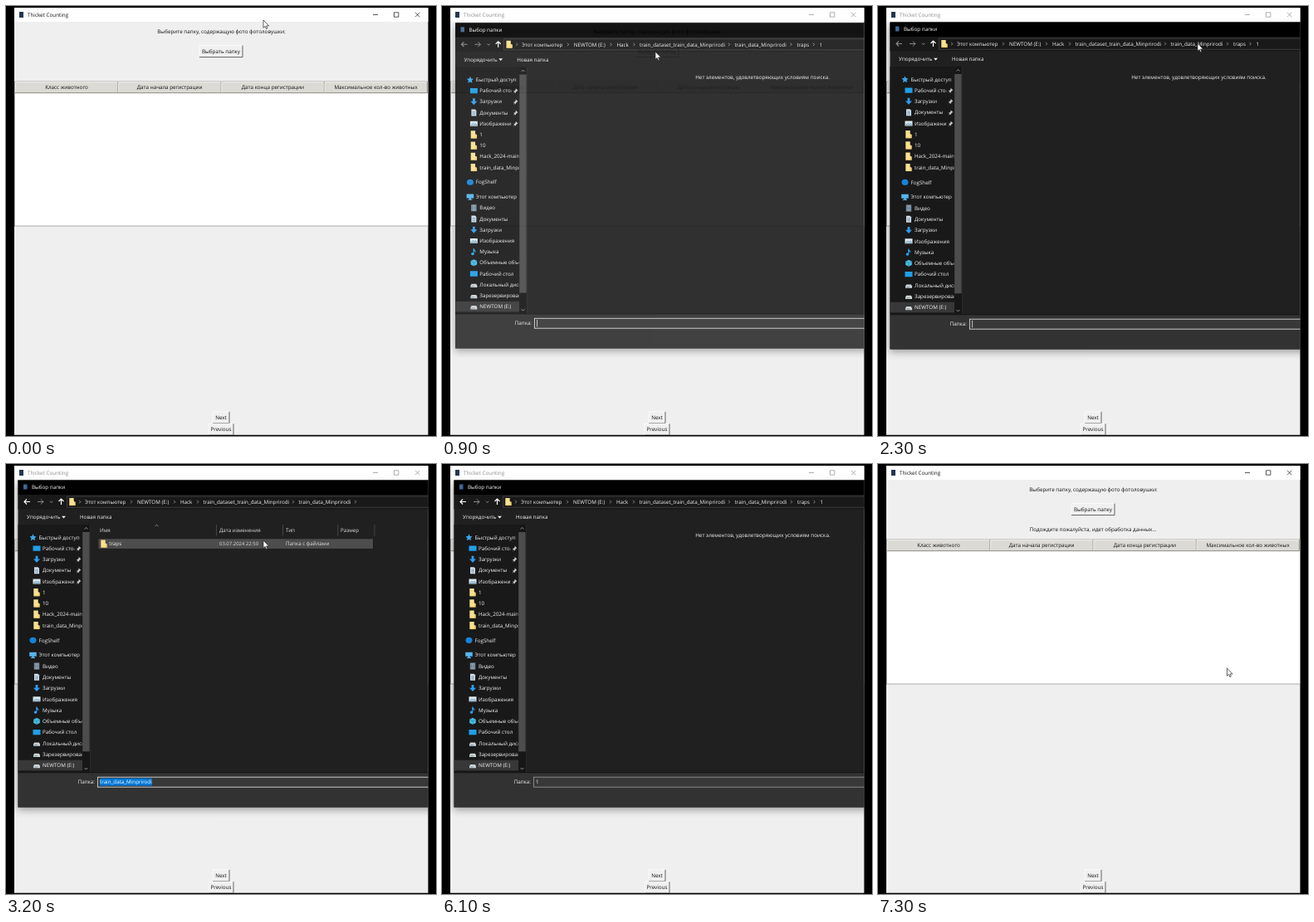
Animation of 518 by 518 pixels, one loop 8 s. Source, as an HTML page:

```html
<!DOCTYPE html>
<html lang="ru">
<head>
<meta charset="utf-8">
<title>Thicket Counting</title>
<style>
html, body { margin: 0; width: 100%; height: 100%; overflow: hidden; background: #000; }
svg { display: block; width: 100vw; height: 100vh; }
text { font-family: "Open Sans", "Noto Sans", sans-serif; text-rendering: geometricPrecision; white-space: pre; }
</style>
</head>
<body>
<svg id="stage" viewBox="0 0 518 518">
  <defs>
    <clipPath id="window"><rect x="10" y="2.3" width="498.5" height="514.4"/></clipPath>
    <clipPath id="sidebar"><rect x="15" y="73" width="76.5" height="299"/></clipPath>
    <clipPath id="pinned"><rect x="15" y="73" width="67.5" height="299"/></clipPath>
    <clipPath id="files"><rect x="102" y="87" width="407" height="284.7"/></clipPath>
    <filter id="blur" x="-10%" y="-10%" width="120%" height="120%"><feGaussianBlur stdDeviation="5"/></filter>
  </defs>
</svg>
<script>
const LOOP = 8000, STEP = 100;
const MAIN_SIZE = 6.3, DIALOG_SIZE = 6.25, ROW = 11.63, ROW_TOP = 90.3;
const INK = '#f2f2f2';
const stage = document.getElementById('stage');

function add(parent, tag, attrs = {}, content) {
  const node = document.createElementNS('http://www.w3.org/2000/svg', tag);
  for (const key in attrs) node.setAttribute(key, attrs[key]);
  if (content !== undefined) node.textContent = content;
  return parent.appendChild(node);
}
const group = (parent, attrs) => add(parent, 'g', attrs);
const box = (parent, x, y, width, height, fill, attrs) => add(parent, 'rect', { x, y, width, height, fill, ...attrs });
const line = (parent, d, stroke, width = 0.7) =>
  add(parent, 'path', { d, stroke, fill: 'none', 'stroke-width': width });
const label = (parent, x, y, content, fill = INK, size = DIALOG_SIZE, attrs) =>
  add(parent, 'text', { x, y: y + 2.2, fill, 'font-size': size, ...attrs }, content);
const centred = (parent, x, y, content) =>
  label(parent, x, y, content, '#111', MAIN_SIZE, { 'text-anchor': 'middle' });
const show = (node, on) => node.setAttribute('visibility', on ? 'inherit' : 'hidden');

// Main window
const main = group(stage, { 'clip-path': 'url(#window)' });
box(main, 10, 2, 499, 515, '#efefef');
box(main, 10, 2, 499, 17, '#fff');
box(main, 16, 7, 5, 7, '#26364f');
const titleBar = group(main);
label(titleBar, 26, 10.5, 'Thicket Counting', 'currentColor', MAIN_SIZE);
line(titleBar, 'M442 10.5h6M467.5 7.8h5.4v5.4h-5.4zM493 7.8l5.4 5.4M498.4 7.8l-5.4 5.4', 'currentColor');

function button(x, y, w, h, name) {
  box(main, x, y, w, h, '#f0f0f0');
  const light = line(main, `M${x} ${y + h}V${y}h${w}`, '#fff');
  const dark = line(main, `M${x} ${y + h}h${w}V${y}`, '#555', 0.9);
  centred(main, x + w / 2, y + h / 2, name);
  return pressed => {
    light.setAttribute('stroke', pressed ? '#555' : '#fff');
    dark.setAttribute('stroke', pressed ? '#fff' : '#555');
  };
}
centred(main, 259.5, 30.7, 'Выберите папку, содержащую фото фотоловушки:');
const pressChoose = button(233, 47.6, 52, 14, 'Выбрать папку');
const status = centred(main, 259, 78.7, 'Подождите пожалуйста, идет обработка данных...');
button(249, 488.8, 20, 14, 'Next');
button(244, 503.2, 30, 13.6, 'Previous');

box(main, 10.4, 91, 498, 174, '#fff', { stroke: '#9a9a96', 'stroke-width': 0.8 });
['Класс животного', 'Дата начала регистрации', 'Дата конца регистрации', 'Максимальное кол-во животных']
  .forEach((name, i) => {
    const x = 11 + i * 124.2;
    box(main, x, 91.3, 124.2, 13.5, '#dcdad5');
    line(main, `M${x + 0.5} 104V91.8h123`, '#f4f3f0');
    line(main, `M${x} 104.7h124V91`, '#77756f', 0.8);
    centred(main, x + 62, 98.2, name);
  });

// Folder dialog
const dialogClip = group(stage, { 'clip-path': 'url(#window)' });
const dialog = group(dialogClip);
box(dialog, 14, 24, 600, 393, '#000', { opacity: 0.33, filter: 'url(#blur)' });
box(dialog, 14.5, 19.5, 600, 394, '#202020');
box(dialog, 14.5, 19.5, 600, 17.5, '#000');
box(dialog, 21, 24.5, 4.5, 6, '#3d6796');
label(dialog, 31, 28, 'Выбор папки', '#fff');
box(dialog, 14.5, 37, 600, 17.5, '#191919');
box(dialog, 73.5, 39, 540, 13.2, '#191919', { stroke: '#4a4a4a', 'stroke-width': 0.7 });

const back = line(dialog, 'M29 45.5h-7M25 42.5l-3 3 3 3', '#fff', 1.1);
line(dialog, 'M38 45.5h7M42 42.5l3 3-3 3', '#8a8a8a', 1);
line(dialog, 'M53 44.8l1.7 1.7 1.7-1.7', '#aaa', 0.8);
line(dialog, 'M66.5 49v-7M63.5 45l3-3 3 3', '#fff', 1.2);

const toolbar = group(dialog);
label(toolbar, 25, 63.7, 'Упорядочить');
add(toolbar, 'path', { d: 'M67 62.7h5l-2.5 2.7z', fill: INK });
label(toolbar, 89, 63.7, 'Новая папка');

// Each icon: fill, shape, then an optional detail line and its colour
const ICONS = {
  star: ['#3ba7ee', 'M4 0l1.2 2.7 2.8.3-2 2 .6 3L4 6.5 1.4 8 2 5 0 3l2.8-.3z'],
  desk: ['#1f9fe8', 'M-.5 .8h9v6.4h-9z'],
  down: ['#2f9df0', 'M2.6 0h2.8v3.6H8L4 8 0 3.6h2.6z'],
  doc: ['#d5dde4', 'M1 0h4.5L7 1.5V8H1z', 'M2.2 3h3.6M2.2 4.6h3.6M2.2 6.2h3.6'],
  pic: ['#dce8ee', 'M-.5 1h9v6h-9z', 'M.6 6l2.2-2.4 1.8 1.3L6 3.8 7.6 6z'],
  folder: ['#f9e08e', 'M.3-.6h5.4v4l2 .8v4.4H.3z', 'M6.6 4.4v3.8H1', '#e3b748'],
  dot: ['#1683d8', 'M0 4a4 3.6 0 108 0a4 3.6 0 10-8 0'],
  pc: ['#55b5ec', 'M-.3 .5h8.6v5H5.2v1.3h1.3v.9h-5v-.9h1.3V5.5H-.3z'],
  video: ['#9298a0', 'M.8 0h6.4v8H.8z', 'M2 0v8M6 0v8M2 4h4'],
  music: ['#2fa2ef', 'M3.2 0h1.1C4.5 2 7 2.3 6.3 5 5.8 3.7 5 3.3 4.3 3.2V6.5a1.8 1.5 0 11-1.1-1.3z'],
  cube: ['#45bde2', 'M4 0l3.8 1.8v4.4L4 8 .2 6.2V1.8z', 'M.4 2L4 3.8 7.6 2M4 3.8V8'],
  drive: ['#d2d2d2', 'M1.2 3h5.6L8 5v2.4H0V5z', 'M1 6h4']
};
function icon(parent, name, x, y) {
  const [fill, shape, detail, detailColor = '#397ba5'] = ICONS[name];
  const g = group(parent, { transform: `translate(${x} ${y - 4})` });
  add(g, 'path', { d: shape, fill });
  if (detail) line(g, detail, detailColor, 0.6);
}

box(dialog, 14.5, 73, 87, 299, '#191919');
box(dialog, 15, 356.7, 77, 12.6, '#383838');
const side = group(dialog, { 'clip-path': 'url(#sidebar)' });
const pinnedItems = group(side, { 'clip-path': 'url(#pinned)' });
const quick = [['desk', 'Рабочий стол'], ['down', 'Загрузки'], ['doc', 'Документы'], ['pic', 'Изображения'],
  ['folder', '1'], ['folder', '10'], ['folder', 'Hack_2024-main'], ['folder', 'train_data_Minprirodi']];
const computer = [['video', 'Видео'], ['doc', 'Документы'], ['down', 'Загрузки'], ['pic', 'Изображения'],
  ['music', 'Музыка'], ['cube', 'Объемные объекты'], ['desk', 'Рабочий стол'], ['drive', 'Локальный диск'],
  ['drive', 'Зарезервировано'], ['drive', 'NEWTOM (E:)']];
function sideItem(parent, kind, name, x, y) {
  icon(parent, kind, x - 11, y);
  label(parent, x, y, name);
}
sideItem(side, 'star', 'Быстрый доступ', 39.5, 88.3);
quick.forEach(([kind, name], i) => {
  const y = 101.6 + i * 13.27;
  sideItem(i < 4 ? pinnedItems : side, kind, name, 44, y);
  if (i < 4) add(side, 'path', { d: `M87.6 ${y - 3}l2.8 2.8-.9.4-1.6 1.6-.2 1.4-1.2-1.2-2 1.8 1.6-2.2-1.2-1.2 1.6-.4 1.2-1.6z`, fill: '#c4c4c4' });
});
sideItem(side, 'dot', 'FogShelf', 39.5, 212.3);
sideItem(side, 'pc', 'Этот компьютер', 39.5, 230.2);
computer.forEach(([kind, name], i) => sideItem(side, kind, name, 44, 243.5 + i * 13.27));

box(dialog, 92, 73, 9, 299, '#171717');
box(dialog, 92.2, 82, 8.4, 264.3, '#4d4d4d');
line(dialog, 'M94.5 78.5l2-2 2 2M94.5 366l2 2 2-2', '#999', 0.9);
line(dialog, 'M101.6 73v299', '#333');

const crumbs = [[95, 'Этот компьютер', 151], [158, 'NEWTOM (E:)', 203], [210, 'Hack', 231],
  [237.6, 'train_dataset_train_data_Minprirodi', 346], [352.6, 'train_data_Minprirodi', 421],
  [428, 'traps', 448.5], [455.5, '1']];
const chevron = (parent, x) => line(parent, `M${x - 0.9} 43.8l1.7 1.8-1.7 1.8`, '#bbb');
icon(dialog, 'folder', 76, 45.5);
chevron(dialog, 89);
const crumbNodes = crumbs.map(([x, name, next]) => {
  const g = group(dialog);
  label(g, x, 45.6, name);
  if (next) chevron(g, next);
  return g;
});

const empty = label(dialog, 386.4, 85.6, 'Нет элементов, удовлетворяющих условиям поиска.', INK, 6.35,
  { 'text-anchor': 'middle' });
const columns = group(dialog);
[[113, 'Имя'], [257, 'Дата изменения'], [337, 'Тип'], [403, 'Размер']]
  .forEach(([x, name]) => label(columns, x, 80, name, '#dcdcdc'));
line(columns, 'M253.5 73v13.5M333.5 73v13.5M399.8 73v13.5M444 73v13.5', '#555');
line(columns, 'M179.5 75l2-1.6 2 1.6', '#aaa');

const files = group(dialog, { 'clip-path': 'url(#files)' });
const hover = box(files, 111.5, 0, 330.5, ROW, '#4d4d4d');
const selected = box(files, 111.5, ROW_TOP, 330.5, ROW, '#777');
function fileList(rows) {
  const list = group(files);
  rows.forEach(([name, date], i) => {
    const y = 96.1 + i * ROW;
    icon(list, 'folder', 114, y);
    label(list, 124.2, y, name);
    label(list, 257, y, date, '#e0e0e0', 5.95);
    label(list, 337, y, 'Папка с файлами', '#e0e0e0');
  });
  return list;
}
const parentList = fileList([['traps', '03.07.2024 22:50']]);
const numbers = Array.from({ length: 25 }, (_, i) => i < 23 ? i + 1 : i + 2);
const trapList = fileList(numbers.map(n => [n, '03.07.2024 11:25']));

box(dialog, 14.5, 372, 600, 41.5, '#323232');
line(dialog, 'M14.5 371.8H614', '#111');
label(dialog, 107, 383.2, 'Папка:', INK, DIALOG_SIZE, { 'text-anchor': 'end' });
const field = box(dialog, 110.4, 377.2, 500, 12, '#383838', { 'stroke-width': 0.9 });
const marked = box(dialog, 113, 378.6, 0, 9, '#0078d7');
const fieldText = label(dialog, 113, 383.2, '', '#fff');
const caret = line(dialog, 'M113.6 378.8v8.6', '#fff', 0.7);

const cursor = add(stage, 'path', {
  d: 'M0 0V9.3L2.1 7.4 3.5 10.5 4.9 9.9 3.6 6.9H6.6Z', fill: '#fff', stroke: '#222', 'stroke-width': 0.7
});

// Tables of steps: time first, then values
const FADE = [[0, 0, 1], [600, 0.08, 0.95], [700, 0.35, 0.966], [800, 0.67, 0.981], [900, 0.92, 0.995],
  [1000, 1, 1], [6500, 0.7, 0.985], [6600, 0.3, 0.966], [6700, 0, 1]];
const DEPTH = [[0, 7], [2400, 5], [4000, 6], [5400, 7]];
const LIST = [[0, 'empty'], [2500, 'parent'], [3600, 'traps'], [5400, 'empty']];
const FIELD = [[0, ''], [2500, 'train_data_Minprirodi'], [3700, 'traps'], [4400, '1']];
const CURSOR = [[0, 310, 17], [200, 257, 55], [1200, 257, 55], [1700, 330, 78], [2100, 392, 52], [2200, 385, 45],
  [2500, 385, 45], [3000, 310, 92], [3900, 310, 92], [4000, 255, 162], [4200, 190, 92], [5600, 190, 92],
  [5700, 293, 131], [7300, 420.5, 246]];

const at = (table, t) => table.findLast(row => row[0] <= t);
function glide(table, t) {
  const i = table.findLastIndex(row => row[0] <= t);
  const [t0, x0, y0] = table[i], [t1, x1, y1] = table[i + 1] || [t0 + 1, x0, y0];
  const p = (t - t0) / (t1 - t0), k = p * p * (3 - 2 * p);
  return [x0 + (x1 - x0) * k, y0 + (y1 - y0) * k];
}

function render(t) {
  const [, opacity, scale] = at(FADE, t);
  dialog.setAttribute('opacity', opacity);
  dialog.setAttribute('transform', `translate(314 195) scale(${scale}) translate(-314 -195)`);
  titleBar.setAttribute('color', t >= 500 && t < 6700 ? '#8c8c8c' : '#111');
  pressChoose(t >= 400 && t < 600);
  show(status, t >= 6800);
  show(toolbar, t >= 900);
  back.setAttribute('stroke', t < 2400 ? '#8a8a8a' : '#fff');

  const depth = at(DEPTH, t)[1], list = at(LIST, t)[1];
  crumbNodes.forEach((node, i) => show(node, i < depth));
  show(empty, list === 'empty');
  show(columns, list !== 'empty');
  show(parentList, list === 'parent');
  show(trapList, list === 'traps');

  const [x, y] = glide(CURSOR, t);
  cursor.setAttribute('transform', `translate(${x} ${y})`);
  show(cursor, t < 5800 || t >= 7300);
  const row = Math.floor((y - ROW_TOP) / ROW);
  const rows = { empty: 0, parent: 1, traps: numbers.length }[list];
  hover.setAttribute('y', ROW_TOP + row * ROW);
  show(hover, row >= 0 && row < rows && x > 111 && x < 442);
  show(selected, (list === 'parent' && t >= 3400) || (list === 'traps' && t >= 4400));

  const name = at(FIELD, t)[1], focused = t < 4400;
  fieldText.textContent = name;
  marked.setAttribute('width', focused && name ? fieldText.getComputedTextLength() : 0);
  field.setAttribute('stroke', focused ? '#d8d8d8' : '#929292');
  show(caret, !name && Math.floor(t / 500) % 2 === (t < 1000 ? 1 : 0));
}

const start = performance.now();
function tick() {
  const t = Math.max(0, performance.now() - start) % LOOP;
  render(Math.floor(t / STEP) * STEP);
  requestAnimationFrame(tick);
}
tick();
</script>
</body>
</html>
```
